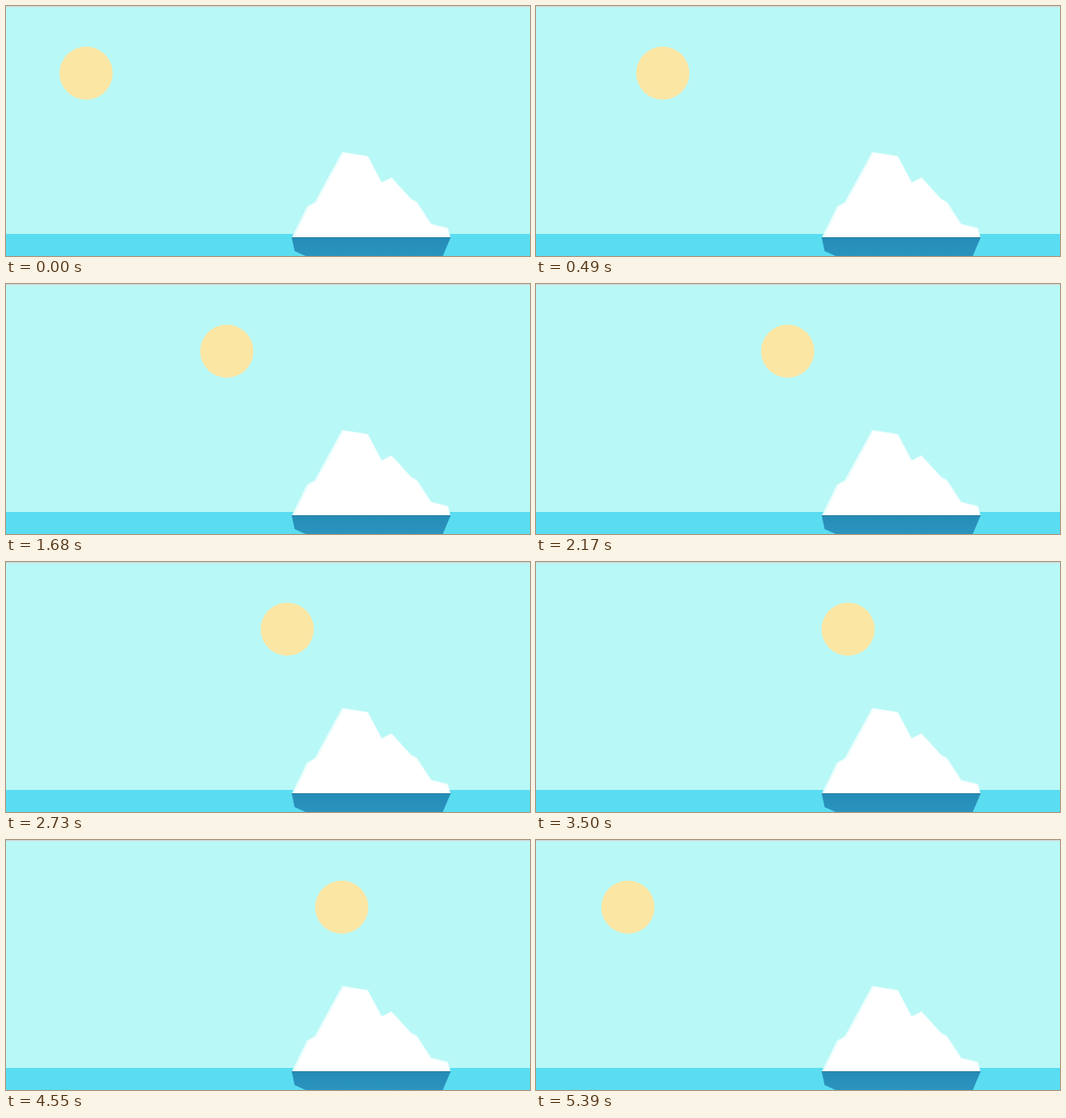
These frames come from a looping animation (640 px wide and 306 px high, 5.46 s). An HTML page:

```html
<!DOCTYPE html>
<html lang="en">
<head>
<meta charset="utf-8">
<title>Sun over an iceberg</title>
<style>
  html, body { margin: 0; width: 100%; height: 100%; overflow: hidden; background: #b8f8f6; }
  svg { display: block; width: 100vw; height: 100vh; }
</style>
</head>
<body>
<svg viewBox="0 0 640 306" preserveAspectRatio="none">
  <defs>
    <linearGradient id="deep" x2="0" y2="1">
      <stop offset="0" stop-color="#268cb7"/>
      <stop offset="1" stop-color="#2a94be"/>
    </linearGradient>
  </defs>
  <rect width="640" height="306" fill="#b8f8f6"/>
  <rect width="640" height="1" fill="#cdd6d6"/>
  <rect y="1" width="640" height="1" fill="#c6efed"/>
  <circle id="sun" cx="98" cy="82.2" r="32.5" fill="#fce6a4"/>
  <rect y="279" width="640" height="27" fill="#5adcf1"/>
  <path fill="#e9fdfd" d="M349 283.5 367.5 245.500 377 240 410.500 178.500 442 183.500 459 215.500 471 209.500 495 236 502 239.500 519.500 266.500 540 271.500 543 283.500Z"/>
  <path fill="#fff" d="M352 283.500 370 246 379.500 240.500 412.500 180 441.500 184.500 458.500 217 470.500 211 494.500 237 501 240.500 518.500 267.500 539 273 541.500 283.500Z"/>
  <path fill="url(#deep)" d="M349 283.500H543L533.500 306H366L352.500 300Z"/>
  <path fill="#2b7fa6" d="M349 283H543V284.200H349Z"/>
</svg>
<script>
  const LOOP = 5460, STEP = 70, RESTART = 5250;
  const PEAK = 415, SETTLE = 5198, RATE = 0.003426;
  const sun = document.getElementById('sun');

  // Quadratic ease-out to the right, then a hard jump back to the left.
  function sunX(t) {
    if (t >= RESTART) return 97 + (t - RESTART) * 0.109;
    const left = Math.max(0, SETTLE - t) * RATE;
    return PEAK - left * left;
  }

  const start = performance.now();
  function draw(now) {
    const t = Math.max(0, now - start) % LOOP;
    sun.setAttribute('cx', sunX(Math.floor(t / STEP) * STEP).toFixed(2));
    requestAnimationFrame(draw);
  }
  draw(start);
</script>
</body>
</html>
```
